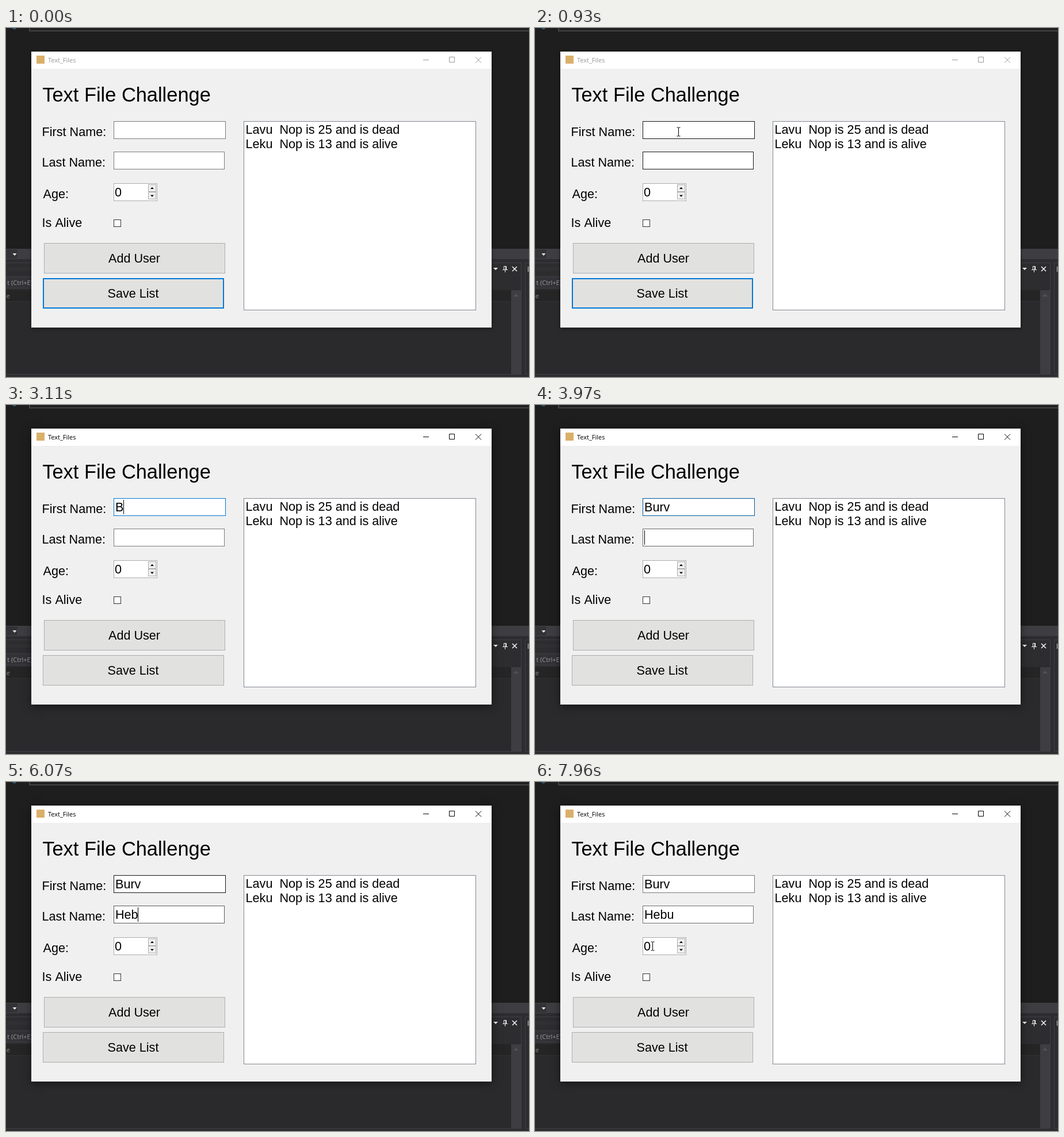
An HTML page for the animation above (8000 ms loop, 909 px wide and 607 px high).

```html
<!DOCTYPE html>
<html lang="en">
<head>
<meta charset="utf-8">
<title>Text_Files</title>
<style>
html, body { margin: 0; width: 100%; height: 100%; overflow: hidden; background: #1e1e1e; }
svg, #shade { position: absolute; }
svg { left: 0; top: 0; display: block; }
#shade { left: 44px; top: 41px; width: 800px; height: 480px; }
.crisp rect, .crisp line { shape-rendering: crispEdges; }
text { white-space: pre; }
.form { font: 21.6px "Liberation Sans", Arial, sans-serif; font-kerning: none; fill: #000; }
.small { font: 11px "Open Sans", "Noto Sans", sans-serif; }
</style>
</head>
<body>
<svg class="crisp" id="back" width="909" height="607" viewBox="0 0 909 607"></svg>
<div id="shade"></div>
<svg class="crisp" id="front" width="909" height="607" viewBox="0 0 909 607"></svg>
<script>
const LOOP = 8000;
const $ = id => document.getElementById(id);

function add(parent, tag, attrs, content) {
  const el = document.createElementNS("http://www.w3.org/2000/svg", tag);
  for (const k in attrs) el.setAttribute(k, attrs[k]);
  if (content) el.textContent = content;
  return parent.appendChild(el);
}
const fill = (p, x, y, w, h, color) => add(p, "rect", { x, y, width: w, height: h, fill: color });
const box = (p, x, y, w, h, color, stroke) =>
  add(p, "rect", { x: x + .5, y: y + .5, width: w - 1, height: h - 1, fill: color, stroke });
const path = (p, d, attrs) => add(p, "path", { d, fill: "none", ...attrs });
const label = (p, x, y, str, attrs) => add(p, "text", { x, y, ...attrs }, str);

// Editor behind the window
const back = $("back");
fill(back, 0, 0, 909, 607, "#1e1e1e");
fill(back, 40, 0, 869, 6, "#434346");
fill(back, 42, 0, 867, 4, "#1f1f20");
path(back, "M11.5 0Q14 3.2 17.5 0", { stroke: "#3f7fae", "stroke-width": 1.2 });
fill(back, 0, 384, 909, 18, "#3e3e42");
box(back, -1, 384, 22, 18, "#333337", "#434346");
path(back, "M11.5 392h7l-3.5 4z", { fill: "#f1f1f1" });
fill(back, 0, 402, 909, 205, "#2d2d30");
box(back, -1, 408, 897, 195, "#2d2d30", "#3f3f46");
for (let i = 0; i < 21; i++)
  for (let j = 0; j < 3; j++)
    if ((i + j) % 2 === 0) fill(back, 3 + i * 2, 417 + j * 2, 1, 1, "#46464a");
box(back, -1, 432, 60, 21, "#333337", "#3f3f46");
label(back, 46, 447, "t (Ctrl+E)", { class: "small", fill: "#999", "text-anchor": "end" });
fill(back, 0, 455, 895, 147, "#2a2a2c");
fill(back, 0, 456, 878, 19, "#252526");
fill(back, 0, 475, 878, 1, "#333337");
label(back, 7, 470, "Line", { class: "small", fill: "#858585", "text-anchor": "end" });
fill(back, 878, 456, 17, 146, "#3e3e42");
path(back, "M882 467h9l-4.5-5z", { fill: "#55504f" });
path(back, "M847 417h8l-4 4z", { fill: "#f1f1f1" });
path(back, "M865.5 414.5h4v6h-4zM863 420.5h9M867.5 421v4M868.5 415v5", { stroke: "#f1f1f1" });
path(back, "M880 415l8 8m0-8l-8 8", { stroke: "#f1f1f1", "stroke-width": 1.6 });
box(back, 902, 408, 20, 195, "#2d2d30", "#3f3f46");
fill(back, 907, 415, 1, 9, "#d0d0d0");

// Form window
const front = $("front");
fill(front, 44, 41, 800, 480, "#f0f0f0");
fill(front, 44, 41, 800, 30, "#fff");
fill(front, 53, 48, 14, 14, "#d9b069");
const caption = label(front, 73, 60, "Text_Files", { class: "small" });
const chrome = path(front, "M725 55.5h10M770.5 50.5h9v9h-9zM816 50.5l10 10m0-10l-10 10", {});

label(front, 63.3, 128, "Text File Challenge", { class: "form", style: "font-size:34.4px;font-kerning:normal" });
const say = (x, y, str, attrs) => label(front, x, y, str, { class: "form", ...attrs });
say(62.6, 188, "First Name:");
say(62.6, 241, "Last Name:");
say(64.6, 296, "Age:");
say(62.6, 346, "Is Alive");

const firstBox = box(front, 187, 162, 195, 31, "#fff", "#7a7a7a");
const lastBox = box(front, 187, 215, 193, 31, "#fff", "#7a7a7a");
const firstText = say(190, 185, "");
const lastText = say(190, 238, "");

box(front, 187, 270, 76, 31, "#fff", "#acacac");
say(189, 292.5, "0");
for (const y of [272, 285]) box(front, 247, y, 14, 13, "#f0f0f0", "#acacac");
path(front, "M251 280h6l-3-3.2zM251 290.5h6l-3 3.2z", { fill: "#000" });
box(front, 187, 333, 13, 13, "#fff", "#333");

box(front, 66, 374, 315, 53, "#e1e1e0", "#adadad");
say(223, 408, "Add User", { "text-anchor": "middle" });
box(front, 64, 435, 315, 53, "#e1e1e0", "#adadad");
const saveFocus = add(front, "rect", {
  x: 65, y: 436, width: 313, height: 51, fill: "none", stroke: "#0078d7", "stroke-width": 2
});
say(221, 469, "Save List", { "text-anchor": "middle" });

box(front, 413, 162, 404, 329, "#fff", "#828790");
say(416.6, 184, "Lavu  Nop is 25 and is dead");
say(416.6, 209, "Leku  Nop is 13 and is alive");

const caret = fill(front, 0, 0, 1, 25, "#000");
const arrow = path(front, "M.5 .5v16l3.7-3.5 2.6 5.6 2.3-1-2.5-5.5h5.2z", { fill: "#fff", stroke: "#000" });
const beam = path(front, "M-3 -7.5h2.5l.5.5.5-.5h2.5M0 -7v14M-3 7.5h2.5l.5-.5.5.5h2.5", { stroke: "#000" });

// Step tables: [start in ms, ...values]
const FIRST = "Burv", LAST = "Hebu";
const firstTyped = [[0, 0], [2100, 1], [3270, 2], [3420, 3], [3580, 4]];
const lastTyped = [[0, 0], [5060, 1], [5680, 2], [6070, 3], [6220, 4]];
const carets = [
  [0], [1090, 190, 165], [1640], [2100, 204, 165], [2570], [3110, 204, 165], [3270, 216, 165],
  [3420, 223, 165], [3580, 234, 165], [3890, 190, 218], [4590], [5060, 205, 218], [5600],
  [5680, 217, 218], [6070, 229, 218], [6220, 241, 218], [6770], [6850, 189, 272], [7320]
];
const firstEdge = [
  [0, "#7a7a7a"], [770, "#4a4a4a"], [850, "#171717"], [1090, "#0b4f86"], [1170, "#0078d7"],
  [3890, "#006cc0"], [3970, "#005a9e"], [4050, "#0b3550"], [4130, "#171717"],
  [7480, "#444"], [7560, "#5e5e5e"], [7640, "#7a7a7a"]
];
const lastEdge = [
  [0, "#7a7a7a"], [530, "#444"], [610, "#171717"], [1320, "#7a7a7a"], [3970, "#6a6a6a"],
  [4130, "#5a5a5a"], [6850, "#666"], [7010, "#7a7a7a"], [7560, "#5a5a5a"], [7800, "#707070"]
];
const pointer = [
  [0], [210, 298, 585, arrow], [290, 284, 490, arrow], [370, 272, 404, arrow],
  [450, 262, 322, arrow], [530, 255, 236, beam], [610, 252, 222, beam], [690, 250, 197, arrow],
  [770, 249, 184, beam], [850, 249, 180, beam], [2100],
  [7320, 249, 181, beam], [7400, 248, 188, beam], [7480, 246, 197, arrow], [7560, 240, 230, beam],
  [7640, 228, 256, arrow], [7720, 216, 288, beam], [7800, 209, 302, arrow],
  [7880, 206, 291, beam], [7960, 204, 285, beam]
];
const at = (steps, t) => steps.findLast(s => s[0] <= t);

function draw(t) {
  firstText.textContent = FIRST.slice(0, at(firstTyped, t)[1]);
  lastText.textContent = LAST.slice(0, at(lastTyped, t)[1]);
  firstBox.setAttribute("stroke", at(firstEdge, t)[1]);
  lastBox.setAttribute("stroke", at(lastEdge, t)[1]);

  const [, cx = -9, cy = -99] = at(carets, t);
  caret.setAttribute("x", cx);
  caret.setAttribute("y", cy);

  const [, px, py, shape] = at(pointer, t);
  for (const el of [arrow, beam]) el.style.display = el === shape ? "" : "none";
  if (shape) {
    const shift = shape === beam ? .5 : 0;
    shape.setAttribute("transform", `translate(${px + shift} ${py + shift})`);
  }

  const active = t >= 1010;
  caption.setAttribute("fill", active ? "#000" : "#999");
  chrome.setAttribute("stroke", active ? "#000" : "#999");
  saveFocus.style.display = active ? "none" : "";
  $("shade").style.boxShadow = active ? "0 3px 14px rgba(0,0,0,.5)" : "0 2px 7px rgba(0,0,0,.4)";
}

const start = performance.now();
function tick() {
  draw((performance.now() - start) % LOOP);
  requestAnimationFrame(tick);
}
tick();
</script>
</body>
</html>
```
